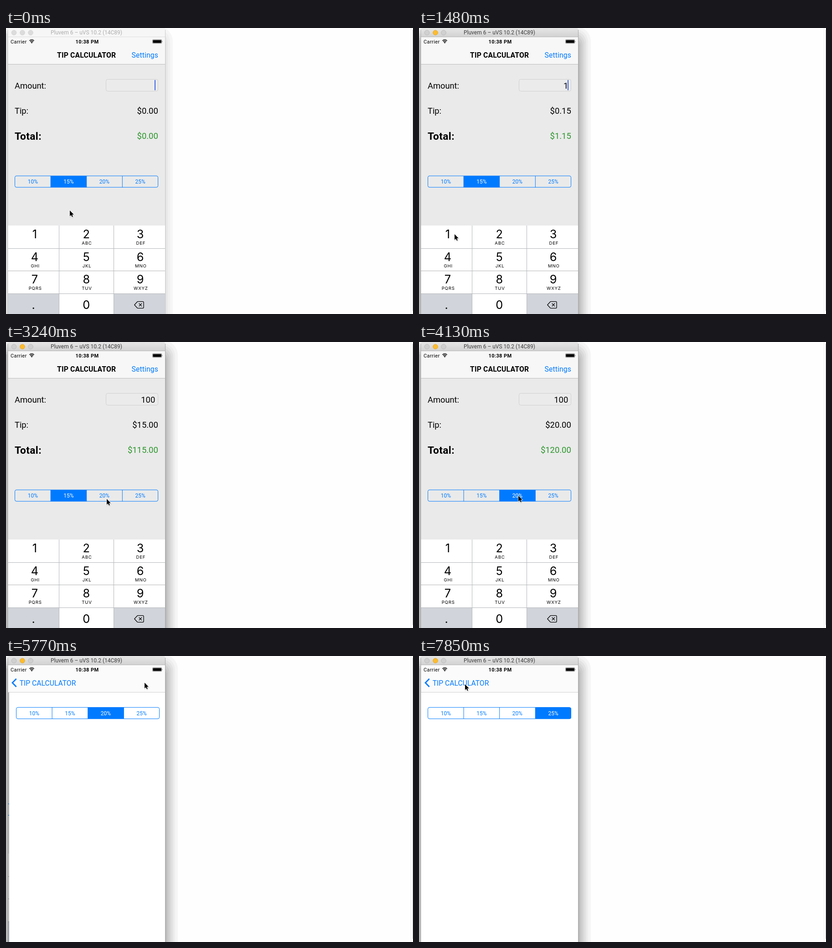
Recreate the animation shown at these times as an HTML page. Size 893 px wide and 627 px high, loop 8 s.

```html
<!DOCTYPE html>
<html lang="en">
<head>
<meta charset="utf-8">
<title>Tip calculator</title>
<style>
html, body { margin: 0; width: 100%; height: 100%; overflow: hidden; background: #fefefe; }
svg { display: block; width: 893px; height: 627px; font-family: Roboto, Inter, sans-serif; }
text { white-space: pre; }
.key { font-family: Inter, Roboto, sans-serif; }
</style>
</head>
<body>
<svg id="stage" viewBox="0 0 893 627"></svg>
<script>
const stage = document.getElementById('stage');
const LOOP = 8000, TICK = 148;
const BLUE = '#007aff', KEY_GREY = '#d1d5db', RULE = '#b4b6b9';
const RATES = [10, 15, 20, 25];

// Pointer waypoints: tick, x, y
const PATH = [
  [4, 140, 400], [6, 120, 421], [8, 82, 449], [9, 78, 452], [10, 78, 452],
  [11, 92, 485], [12, 124, 545], [14, 168, 598], [15, 169, 599], [17, 169, 599],
  [18, 180, 545], [20, 212, 391], [21, 221, 344.5], [27, 221, 342], [28, 218, 337],
  [30, 232, 290], [33, 296, 85], [34, 304, 58.5], [41, 304, 58.5], [43, 305, 75],
  [46, 308, 129], [49, 310, 130], [50, 252, 144], [51, 150, 104], [52, 76, 67],
  [53, 101, 62]
];

const rect = (x, y, w, h, fill, more = '') =>
  `<rect x="${x}" y="${y}" width="${w}" height="${h}" fill="${fill}" ${more}/>`;
const text = (x, y, size, str, fill = '#000', more = '') =>
  `<text x="${x}" y="${y}" font-size="${size}" fill="${fill}" ${more}>${str}</text>`;
const line = (d, stroke, width = 1, more = '') =>
  `<path d="${d}" fill="none" stroke="${stroke}" stroke-width="${width}" ${more}/>`;
const MID = 'text-anchor="middle"', END = 'text-anchor="end"';

function pointerAt(k) {
  const i = PATH.findIndex(p => p[0] >= k);
  if (i < 0) return PATH[PATH.length - 1].slice(1);
  if (i === 0) return PATH[0].slice(1);
  const [k0, x0, y0] = PATH[i - 1], [k1, x1, y1] = PATH[i];
  const f = (k - k0) / (k1 - k0);
  return [x0 + (x1 - x0) * f, y0 + (y1 - y0) * f];
}

function caretOpacity(k) {
  if (k >= 10 && k < 20) return 1;
  if (k >= 34) return 0;
  return [1, 1, 0.5, 0, 0, 0.5, 1][(k < 20 ? k : k - 18) % 7];
}

function shadow(active) {
  const bands = active
    ? [[377, '#f5f5f5'], [371, '#ededed'], [367, '#e3e3e3'], [363, '#d9d9d9'], [359, '#cecece'], [355, '#c3c3c3'], [352, '#b7b7b7']]
    : [[366, '#f6f6f6'], [360, '#f0f0f0'], [355, '#e8e8e8'], [351, '#dcdcdc']];
  return bands.map(([right, fill], i) =>
    rect(-60, i * 5 - 3, right + 60, 720, fill, `rx="${32 - i * 3}"`)).join('');
}

function titleBar(active) {
  const dots = [17.5, 36, 54].map((x, i) => {
    const lit = active && i === 1;
    const fill = lit ? '#fdbc2c' : active ? '#d0d0d0' : '#dcdcdc';
    const edge = lit ? '#e0a028' : active ? '#b4b4b4' : '#cfcfcf';
    return `<circle cx="${x}" cy="10.2" r="5.3" fill="${fill}" stroke="${edge}" stroke-width=".8"/>`;
  }).join('');
  return `<path d="M4 20V4Q4 0 8 0H345Q349 0 349 4V20Z" fill="${active ? 'url(#bar)' : '#f6f6f6'}"/>` +
    line('M4 19.5H349', active ? '#b9b9b9' : '#dddddd') + dots +
    text(176.5, 14.4, 12, 'Pluvem 6 – uVS 10.2 (14C89)', active ? '#3e3e3e' : '#adadad', MID);
}

function statusBar() {
  const wifi = line('M51.4 27.9Q56.5 23.6 61.6 27.9M53.2 30.1Q56.5 27.2 59.8 30.1', '#000', 1.5) +
    '<path d="M54.4 31.5Q56.5 29.9 58.6 31.5L56.5 33.8Z"/>';
  const battery = rect(321.4, 25.4, 20.4, 8.4, 'none', 'rx="1.8" stroke="#666" stroke-width=".7"') +
    rect(322.4, 26.4, 18.4, 6.4, '#000', 'rx=".8"') +
    '<path d="M342.6 28.2Q344.2 29.6 342.6 31Z"/>';
  return text(10, 33.5, 11, 'Carrier', '#000', 'letter-spacing=".4"') + wifi +
    text(178, 33.5, 11, '10:38 PM', '#000', MID + ' font-weight="700" letter-spacing=".4"') + battery;
}

function segments(y, pick) {
  const w = 78.6, h = 25;
  const cell = i => 19.5 + i * w;
  const fill = i => i === 0 || i === 3
    ? rect(cell(i), y, w, h, BLUE, 'rx="3.5"') + rect(i ? cell(i) : cell(i) + 4, y, w - 4, h, BLUE)
    : rect(cell(i), y, w, h, BLUE);
  return fill(pick) +
    rect(19.5, y, 314, h, 'none', `rx="3.5" stroke="${BLUE}"`) +
    line([1, 2, 3].map(i => `M${cell(i).toFixed(1)} ${y}v${h}`).join(''), BLUE) +
    RATES.map((r, i) => text(cell(i) + w / 2, y + 17, 12, r + '%', i === pick ? '#fff' : BLUE, MID)).join('');
}

function keypad(pressed) {
  const xs = [4, 117, 236, 349], ys = [433, 483, 533, 582, 632];
  const keys = ['1', '2 ABC', '3 DEF', '4 GHI', '5 JKL', '6 MNO', '7 PQRS', '8 TUV', '9 WXYZ', '.', '0', 'del'];
  const mids = [63, 176.3, 294.6];
  let out = '';
  keys.forEach((key, i) => {
    const c = i % 3, r = Math.floor(i / 3);
    const [digit, letters] = key.split(' ');
    const special = digit === '.' || digit === 'del';
    const grey = special ? pressed !== digit : pressed === digit;
    out += rect(xs[c], ys[r], xs[c + 1] - xs[c], ys[r + 1] - ys[r], grey ? KEY_GREY : '#fff');
    if (digit === 'del') {
      out += line('M281.8 607L288 600.2Q288.6 599.6 289.5 599.6H300Q302 599.6 302 601.6V612.3Q302 614.3 300 614.3H289.5Q288.6 614.3 288 613.7Z' +
        'M291.7 603.8L298 610.1M298 603.8L291.7 610.1', '#000', 1.3, 'stroke-linejoin="round"');
      return;
    }
    const base = r === 3 ? 616 : 461 + r * 49.5;
    out += text(special ? 60.2 : mids[c], base, 25.3, digit, '#000', MID + ' class="key"');
    if (letters) out += text(mids[c] + 1.2, base + 14, 9.6, letters, '#000', MID + ' class="key" letter-spacing=".8"');
  });
  return out + line('M4 483.5H349M4 532.5H349M4 582.5H349M116.5 433V627M236.5 433V627', RULE);
}

function calculator(k) {
  const amount = k < 10 ? '' : k < 15 ? '1' : k < 17 ? '10' : '100';
  const pick = k < 24 ? 1 : 2;
  const tip = amount * RATES[pick] / 100;
  const money = v => '$' + v.toFixed(2);
  const pressed = k === 9 ? '1' : k === 14 || k === 16 ? '0' : '';
  return rect(4, 79, 345, 354, '#eaeaea') +
    text(19, 132.5, 18.3, 'Amount:') + text(19, 187.5, 18.3, 'Tip:') +
    text(19, 244.5, 22.6, 'Total:', '#000', 'font-weight="700" letter-spacing=".4"') +
    rect(219.5, 112.5, 114, 26, '#ebebeb', 'rx="4" stroke="#d0d0d0"') +
    text(327.3, 132.5, 18.4, amount, '#000', END) +
    rect(326, 114, 2, 22.5, '#3f66e6', `opacity="${caretOpacity(k)}"`) +
    text(333.8, 187.5, 18.4, money(tip), '#000', END) +
    text(333.8, 242.7, 18.4, money(Number(amount) + tip), '#2c952c', END) +
    segments(324.2, pick) + keypad(pressed);
}

function calculatorNav(k) {
  return rect(4, 20, 345, 59, '#f7f7f7') +
    text(176.6, 64.5, 15.7, 'TIP CALCULATOR', '#000', MID + ' font-weight="600" letter-spacing=".2"') +
    text(334, 64.5, 15.7, 'Settings', k >= 35 ? '#c8dff7' : BLUE, END + ' letter-spacing=".15"');
}

function settings(k) {
  const slide = k === 39 ? 3 : 0;
  const under = slide
    ? `<g transform="translate(-100)">${calculator(k)}</g>` + rect(4, 79, 4, 548, '#000', 'opacity=".25"')
    : '';
  return under +
    `<g transform="translate(${slide})">${rect(4, 79, 345, 548, '#fff')}${segments(112.7, k < 47 ? 2 : 3)}</g>` +
    rect(4, 20, 345, 59, '#fbfbfb') +
    line('M22.6 50L14 58.8L22.6 67.6', BLUE, 2.8) +
    text(29.7, 64.5, 15.7, 'TIP CALCULATOR', BLUE);
}

function pointer(k) {
  const [x, y] = pointerAt(k);
  const shape = 'M0 0V12.6L2.9 9.9L4.9 14.3L6.8 13.5L5 9.1H8.8Z';
  return `<g transform="translate(${x.toFixed(1)} ${y.toFixed(1)})">` +
    `<path d="${shape}" transform="translate(.6 1.4)" stroke="#000" stroke-width="1.6" opacity=".12"/>` +
    `<path d="${shape}" stroke="#fff" stroke-width="1.5" paint-order="stroke"/></g>`;
}

const DEFS = '<defs><linearGradient id="bar" x2="0" y2="1"><stop stop-color="#e6e6e6"/>' +
  '<stop offset="1" stop-color="#d1d1d1"/></linearGradient>' +
  '<clipPath id="screen"><rect x="4" y="20" width="345" height="607"/></clipPath></defs>';

function render(k) {
  const active = k >= 9;
  const screen = k < 39 ? calculator(k) + calculatorNav(k) : settings(k);
  stage.innerHTML = DEFS + rect(0, 0, 893, 627, '#fefefe') +
    line('M888.5 0V627', '#f1f1f1') + line('M892.5 4V620', '#c4c4c4') +
    shadow(active) + titleBar(active) +
    `<g clip-path="url(#screen)">${screen}${line('M4 79.5H349', k < 39 ? '#bdbdbd' : '#cfcfcf')}${statusBar()}</g>` +
    line('M349.5 4V627', active ? '#a9a9a9' : '#cdcdcd') +
    line('M4 4V627', active ? '#a9a9a9' : '#c9c9c9') + pointer(k);
}

let last = -1;
function loop() {
  const k = Math.floor((performance.now() % LOOP + 20) / TICK);
  if (k !== last) render(last = k);
  requestAnimationFrame(loop);
}
loop();
</script>
</body>
</html>
```
